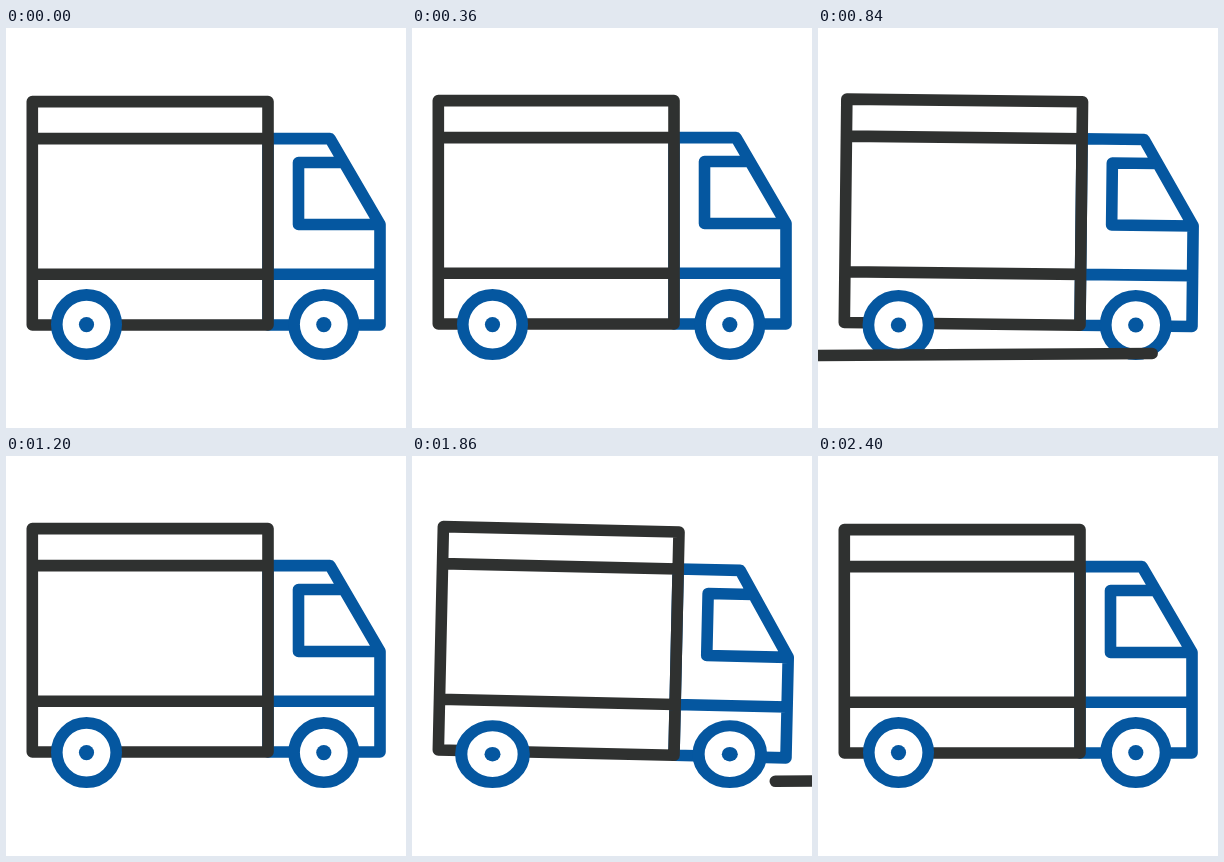
An HTML page for the animation above (2430 ms loop, 400x400 px).

```html
<!DOCTYPE html>
<html lang="en">
<head>
<meta charset="utf-8">
<title>Truck</title>
<style>
  html, body { margin: 0; height: 100%; overflow: hidden; background: #fff; }
  svg { display: block; width: 100vw; height: 100vh; }
  .line { fill: none; stroke-width: 11.6; stroke-linecap: round; stroke-linejoin: round; }
  .blue { stroke: #0557a0; }
  .dark { stroke: #2f3130; }
  .wheel .line { fill: #fff; }
</style>
</head>
<body>
<svg viewBox="0 0 400 400">
  <defs>
    <g id="wheel" class="wheel">
      <circle class="line blue" r="29.7"/>
      <circle r="7.6" fill="#0557a0"/>
    </g>
  </defs>
  <g id="body">
    <path class="line blue" d="M262 109.6H324L374 195.5V296H262ZM337 133.5H292.5V195.5H374M262 245.2H374"/>
    <path class="line dark" d="M26.3 72.6H262V296H26.3ZM26.3 109.6H262M26.3 245.2H262"/>
  </g>
  <use class="tyre" href="#wheel" data-x="80.5"/>
  <use class="tyre" href="#wheel" data-x="317.8"/>
  <path id="road" class="line dark"/>
</svg>
<script>
const LOOP = 2430, END = 2400, CYCLE = 540;
const SETTLE = 120;      // time at rest before the first and after the last jolt
const TILT = 1.38;       // degrees
const GROUND = 332;
const ROAD = { length: 371, speed: 6.67, arrive: 235.5 };

const body = document.getElementById('body');
const road = document.getElementById('road');
const tyres = document.querySelectorAll('.tyre');
const roadY = x => 325.2 + (372 - x) * 0.006;

function draw(t) {
  t = Math.min(t, END);
  const edge = Math.min(t, END - t);
  const jolt = edge < SETTLE ? 0 : Math.sin(2 * Math.PI * (t - SETTLE) / CYCLE) ** 5;
  const squash = jolt * jolt;
  const rest = edge < SETTLE ? (1 + Math.cos(Math.PI * edge / SETTLE)) / 2 : 0;

  body.setAttribute('transform',
    `translate(0 ${rest + 2.2 * squash}) rotate(${TILT * jolt} 200 296)`);

  for (const tyre of tyres) {
    const sx = 1 + 0.06 * squash, sy = 1 - 0.05 * squash;
    tyre.setAttribute('transform',
      `translate(${tyre.dataset.x} ${GROUND - 35.4 * sy}) scale(${sx} ${sy})`);
  }

  // The road streak runs from right to left once per cycle.
  const left = 400 - ROAD.speed * (t % CYCLE - ROAD.arrive);
  const right = left + ROAD.length;
  const visible = t < 4 * CYCLE && left < 410 && right > -10;
  road.setAttribute('d', visible ? `M${left} ${roadY(left)}L${right} ${roadY(right)}` : '');
}

function tick() {
  draw(performance.now() % LOOP);
  requestAnimationFrame(tick);
}
tick();
</script>
</body>
</html>
```
